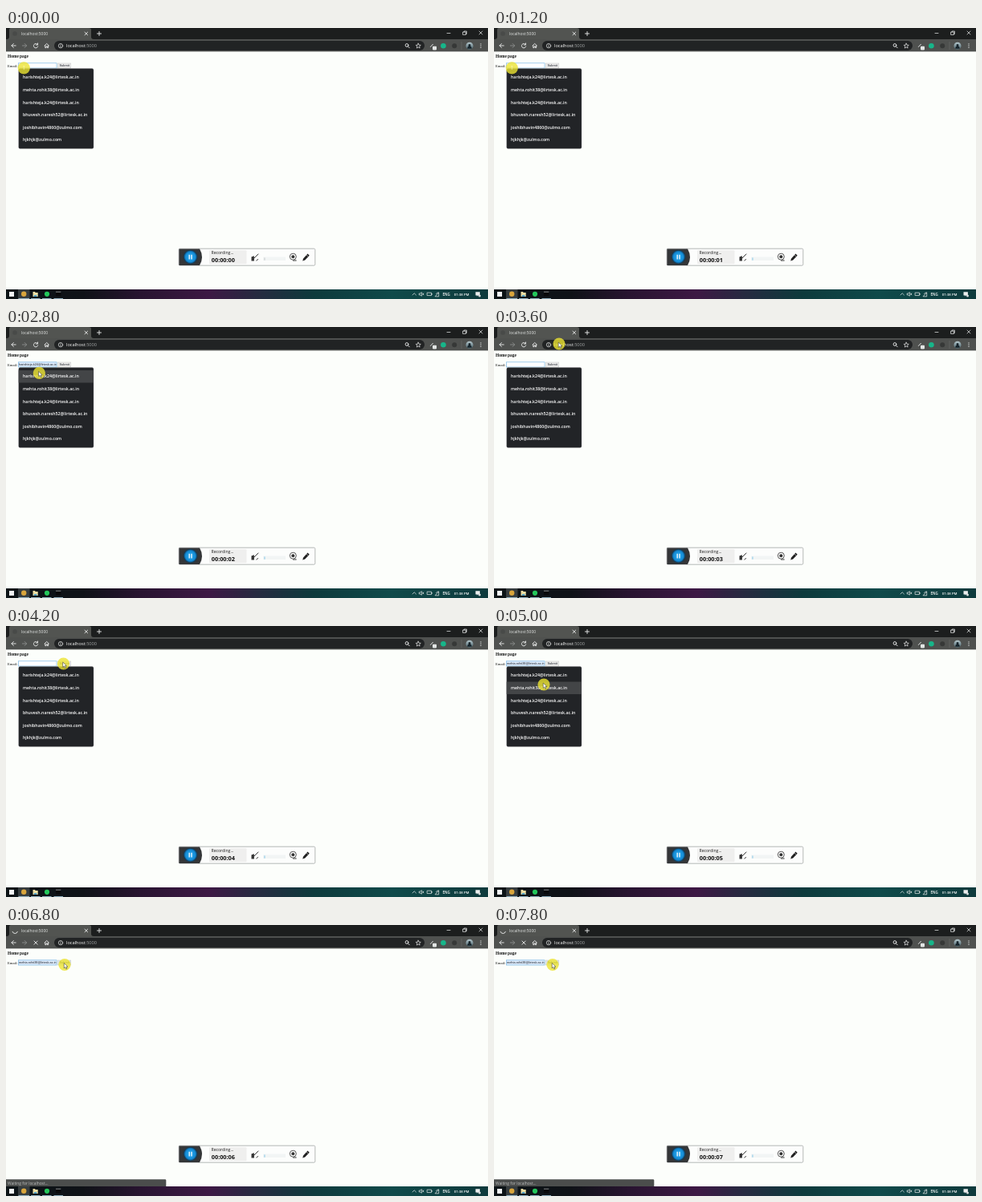
An HTML page that plays this animation: 600 px wide and 338 px high, repeating every 8000 ms.

```html
<!DOCTYPE html>
<html lang="en">
<head>
<meta charset="utf-8">
<title>Home page</title>
<style>
  html, body { margin: 0; width: 100%; height: 100%; overflow: hidden; background: #fcfefb; }
  svg { display: block; width: 100vw; height: 100vh; }
  text { font-family: "Open Sans", "Noto Sans", sans-serif; fill: #fff; white-space: pre; }
  .serif { font-family: "Liberation Serif", serif; fill: #111; }
  .form { font-family: "Liberation Sans", sans-serif; fill: #1a1f28; }
  .line { fill: none; stroke: #eceeee; stroke-width: .9; stroke-linecap: round; stroke-linejoin: round; }
  .dim { stroke: #8b8e8d; }
  .thin { stroke-width: .7; }
  #list text { font-size: 5.25px; font-weight: 600; }
</style>
</head>
<body>
<svg viewBox="0 0 600 338" preserveAspectRatio="none">
  <defs>
    <linearGradient id="taskbar">
      <stop offset="0" stop-color="#0c1417"/>
      <stop offset=".16" stop-color="#0f1217"/>
      <stop offset=".28" stop-color="#281430"/>
      <stop offset=".42" stop-color="#3d1844"/>
      <stop offset=".52" stop-color="#262a40"/>
      <stop offset=".64" stop-color="#0d3a3c"/>
      <stop offset=".8" stop-color="#0f4a4a"/>
      <stop offset="1" stop-color="#0e3a3c"/>
    </linearGradient>
    <linearGradient id="avatar" x2="0" y2="1">
      <stop offset="0" stop-color="#b4c6cb"/>
      <stop offset="1" stop-color="#4c666e"/>
    </linearGradient>
    <radialGradient id="pause">
      <stop offset="0" stop-color="#2aa9ee"/>
      <stop offset=".75" stop-color="#168fd8"/>
      <stop offset="1" stop-color="#0b5f99"/>
    </radialGradient>
    <clipPath id="fieldClip"><rect x="15.7" y="43.8" width="47" height="6"/></clipPath>
  </defs>

  <rect width="600" height="338" fill="#fcfefb"/>

  <g id="browser">
    <rect width="600" height="14" fill="#1c1e1e"/>
    <path d="M1 14Q4 14 4 11V2Q4 0 6 0H103Q106 0 106 2V11Q106 14 109 14Z" fill="#525451"/>
    <rect y="14" width="600" height="15.4" fill="#4f514f"/>
    <circle id="favicon" cx="11" cy="7" r="2.8" fill="#484a48"/>
    <path id="spinner" class="line" d="M8 8.3A3.4 3.4 0 0 0 14.4 8.3"/>
    <text x="19" y="8.7" font-size="4.9" style="fill:#e6e8e7">localhost:5000</text>
    <path class="line" d="M98 5.2l3.6 3.6m0-3.6l-3.6 3.6M113.5 7h5M116 4.5v5"/>
    <path class="line thin" d="M549 6.5h4M569 5h3.4v3.4h-3.4zM570 5V4h3.4v3.4h-1M589 4l4 4m0-4l-4 4"/>

    <rect x="60" y="16" width="461" height="12" rx="6" fill="#212324"/>
    <path class="line" d="M12.2 22H7m2.4-2.5L6.9 22l2.5 2.5"/>
    <path class="line dim" d="M20.4 22h5.2m-2.4-2.5l2.5 2.5-2.5 2.5"/>
    <path id="reload" class="line" d="M39.2 20.5A2.7 2.7 0 1 0 39.7 23M39.5 19v2h-2"/>
    <path id="stop" class="line" d="M35 20l4.2 4.2m0-4.2L35 24.2"/>
    <path class="line" d="M48 22l2.7-2.5 2.7 2.5M48.8 22v2.7h1.2v-1.8h1.4v1.8h1.2V22"/>
    <circle class="line thin" cx="68" cy="22.2" r="2.7"/>
    <path class="line thin" d="M68 22v1.5m0-2.8v.1"/>
    <text x="75" y="24.2" font-size="5.65">localhost<tspan fill="#a0a3a3">:5000</tspan></text>
    <circle class="line" cx="499" cy="21.5" r="1.9"/>
    <path class="line" d="M500.5 23l1.7 1.8"/>
    <path class="line thin" d="M513.2 19.2l.9 2 2.2.2-1.7 1.5.5 2.2-1.9-1.2-1.9 1.2.5-2.2-1.7-1.5 2.2-.2z"/>
    <path class="line" d="M528.4 23.5l3-3.2"/>
    <rect x="531" y="22.8" width="5" height="4.6" rx=".8" fill="#e2e5e4"/>
    <circle cx="544.4" cy="22.2" r="3.3" fill="#17b68a"/>
    <circle cx="558.2" cy="22.2" r="3" fill="#363837"/>
    <path d="M567 17v10" stroke="#6d706e" stroke-width=".6"/>
    <circle cx="577" cy="22.2" r="4.5" fill="url(#avatar)"/>
    <path d="M574.2 25.7Q574.3 23 576 22.6a1.5 1.5 0 1 1 2 0Q579.7 23 579.8 25.7Z" fill="#17242b"/>
    <path d="M591 19.8v.1m0 2.2v.1m0 2.2v.1" class="line" style="stroke-width:1.2"/>
  </g>

  <g id="page">
    <text class="serif" x="2" y="37.2" font-size="5.4" font-weight="bold">Home page</text>
    <text class="serif" x="2" y="48.6" font-size="4.7">Email:</text>
    <rect id="field" x="15.4" y="43.8" width="47.6" height="6.2" stroke="#7db9e6" stroke-width=".7"/>
    <g clip-path="url(#fieldClip)"><text id="value" class="form" x="16" y="48.2" font-size="3.85"></text></g>
    <rect id="button" x="64.4" y="44" width="16.4" height="6" stroke="#bcbebd" stroke-width=".4"/>
    <text class="form" x="66.4" y="48.4" font-size="4">Submit</text>
  </g>

  <g id="list">
    <rect x="15.7" y="50.6" width="93.3" height="100" rx="1.8" fill="#222427" stroke="#8b8d8e" stroke-width=".3"/>
    <rect id="hover" x="15.7" width="93.3" height="15.5" fill="#434547"/>
  </g>

  <g id="status">
    <path d="M0 317.3H198Q199.3 317.3 199.3 318.6V326H0Z" fill="#4b4d4c"/>
    <text x="2" y="323.6" font-size="4.9" style="fill:#c0c3c2">Waiting for localhost...</text>
  </g>

  <g id="recorder">
    <rect x="215.2" y="275.2" width="169.6" height="21" rx="1.5" fill="#fcfdfc" stroke="#a4a7a6" stroke-width=".8"/>
    <path d="M215.4 275.4H241Q247 285.7 241 296H215.4Z" fill="#343638"/>
    <circle cx="229.6" cy="285.6" r="9.2" fill="#1d3b4f"/>
    <circle cx="229.6" cy="285.6" r="7.8" fill="url(#pause)"/>
    <path d="M228.2 282.8v5.6m2.8-5.6v5.6" stroke="#fff" stroke-width="1.3"/>
    <rect x="253" y="277.2" width="46.5" height="17" rx="1" fill="#efefee"/>
    <text x="255.6" y="282.4" font-size="5.1" style="fill:#222">Recording...</text>
    <text id="clock" x="255.8" y="291.8" font-size="7.3" font-weight="bold" style="fill:#111"></text>
    <path d="M305.5 285.5l3.4-1.2v6.2h-3.4z" fill="#333"/>
    <path d="M308.4 287.6l5.8-5.9M311.6 290.4l2.2-2.2" stroke="#333" fill="none"/>
    <rect x="320" y="285.4" width="28" height="4.6" rx=".6" fill="#f2f5f5"/>
    <rect id="level" x="321.4" y="286.4" width="1.1" height="3.4"/>
    <g fill="none" stroke="#444">
      <circle cx="357.3" cy="285.2" r="4" stroke-width=".9"/>
      <path d="M357 290h4.6" stroke-width="1.1"/>
    </g>
    <circle cx="357.3" cy="285.2" r="2" fill="#333"/>
    <path d="M369.2 290.4l.9-3 5.4-5.8 2.2 2.1-5.5 5.8z" fill="#222"/>
    <path d="M374 283.1l2.2 2.1" stroke="#fff" stroke-width=".5"/>
  </g>

  <g id="taskbarRow">
    <rect y="326" width="600" height="12" fill="url(#taskbar)"/>
    <rect x="15" y="326" width="14.5" height="12" fill="#363c3e"/>
    <rect x="4" y="329" width="6" height="6" fill="#f2f4f5"/>
    <circle cx="22.2" cy="331.8" r="3.2" fill="#d9a53c"/>
    <path d="M33.5 329h2.4l.8 1h3v5h-6.2z" fill="#efe0a4"/>
    <path d="M34.8 333h3.6v2h-3.6z" fill="#58a5c8"/>
    <circle cx="51" cy="331.8" r="3.1" fill="#24c75b"/>
    <rect x="62" y="329" width="6.3" height="5.2" fill="#08090a"/>
    <path d="M62 329.2h6.3" stroke="#a4a9ab" stroke-width=".8"/>
    <path d="M15.5 337.5h13.5m2 0h11.5m2.5 0h11.5m3 0h11.5" stroke="#9cc0d2" stroke-width=".9"/>
    <g class="line thin">
      <path d="M506 333l2.2-2.2 2.2 2.2"/>
      <path d="M514.6 331h1.2l1.5-1.3v4.6l-1.5-1.3h-1.2zM518.8 331l1 1.8m0-1.8l-1 1.8"/>
      <path d="M524.5 330.2h5v3.4h-5zM530.2 331.3v1.2"/>
      <path d="M534.3 334.5l4.4-4.4v4.4zM535.4 331.4q1-1.4 3.2-1.5"/>
    </g>
    <path d="M584.5 329.3h5.4v4.2h-2.2l-1.3 1.3v-1.3h-1.9z" fill="#eceeee"/>
    <circle cx="589.5" cy="334" r="1.5" fill="#d8dbdd"/>
    <text x="543.5" y="333.8" font-size="4.5" font-weight="600">ENG</text>
    <text x="557.8" y="333.8" font-size="4.3" font-weight="600">01:38 PM</text>
  </g>

  <g id="pointer">
    <circle r="7.6" fill="#ece432" opacity=".8"/>
    <path id="arrow" d="M-.8-2V4.4L.7 3l1.1 2.5 1.2-.5L1.9 2.6h2z" fill="#fff" stroke="#222" stroke-width=".5"/>
    <path id="beam" d="M-1-2.2H1M0-2.2V2.2" stroke="#f8f6c0" stroke-width=".6"/>
  </g>
</svg>

<script>
const LOOP = 8000, STEP = 200;
const ROW_TOP = 54, ROW_HEIGHT = 15.55;
const PICK_TIME = 5400, LOAD_TIME = 6600;
const emails = [
  'harishteja.k24@lirtesk.ac.in',
  'mehta.rohit38@lirtesk.ac.in',
  'harishteja.k24@lirtesk.ac.in',
  'bhuvesh.naresh52@lirtesk.ac.in',
  'joshibhavin4860@zulmo.com',
  'hjkhjk@zulmo.com'
];
// time, x, y
const path = [
  [0, 22.3, 49.8], [1400, 22.3, 49.8], [2000, 34, 64], [2600, 34, 64], [3400, 81, 21],
  [3800, 81, 21], [4600, 62, 73], [5400, 62, 73], [5800, 73, 49.5], [LOOP, 73, 49.5]
];

const $ = id => document.getElementById(id);
const show = (id, on) => $(id).setAttribute('visibility', on ? 'visible' : 'hidden');

emails.forEach((email, i) => {
  const label = document.createElementNS('http://www.w3.org/2000/svg', 'text');
  label.setAttribute('x', 21);
  label.setAttribute('y', 63.4 + i * ROW_HEIGHT);
  label.textContent = email;
  $('list').append(label);
});

function pointerAt(t) {
  const i = path.findIndex(([time]) => time > t);
  const [t0, x0, y0] = path[i - 1], [t1, x1, y1] = path[i];
  const p = (t - t0) / (t1 - t0), e = p * p * (3 - 2 * p);
  return [x0 + (x1 - x0) * e, y0 + (y1 - y0) * e];
}

function draw(t) {
  const [x, y] = pointerAt(t);
  const open = t < PICK_TIME, loading = t >= LOAD_TIME;
  const row = open ? Math.floor((y - ROW_TOP) / ROW_HEIGHT) : -1;
  const hovering = row >= 0;
  const overField = open && y > 43 && y < 51 && x < 63;

  $('pointer').setAttribute('transform', `translate(${x} ${y})`);
  show('arrow', !overField);
  show('beam', overField);

  $('list').style.display = open ? '' : 'none';
  show('hover', hovering);
  $('hover').setAttribute('y', ROW_TOP + Math.max(row, 0) * ROW_HEIGHT);
  $('value').textContent = open ? emails[row] || '' : emails[1];
  $('field').setAttribute('fill', hovering || !open ? '#dceafa' : '#fff');
  $('button').setAttribute('fill', !open && x > 64 ? '#dfe8ef' : '#ececeb');

  show('favicon', !loading);
  show('spinner', loading);
  $('spinner').setAttribute('transform', `rotate(${(t - 7800) * .36} 11.2 7)`);
  show('reload', !loading);
  show('stop', loading);
  show('status', loading);

  $('clock').textContent = '00:00:0' + Math.floor(t / 1000);
  $('level').setAttribute('fill', t < STEP ? '#c9cdd0' : '#8fcbe8');
}

const start = performance.now();
function tick() {
  const t = (performance.now() - start) % LOOP;
  draw(Math.floor(t / STEP) * STEP);
  requestAnimationFrame(tick);
}
tick();
</script>
</body>
</html>
```
